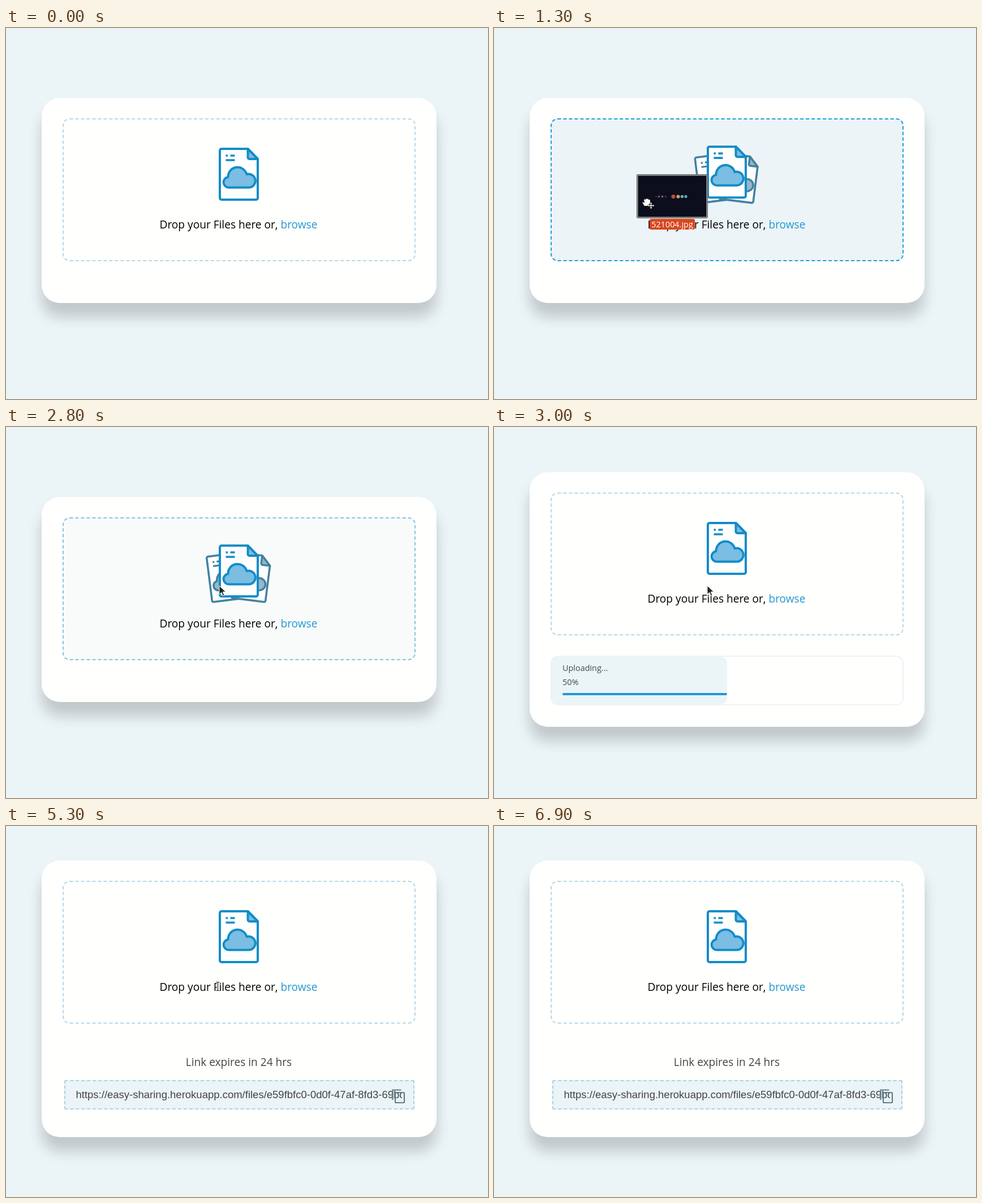
Recreate the animation shown at these times as an HTML page. Size 852 by 657 pixels, loop 7400 ms.

```html
<!DOCTYPE html>
<html lang="en">
<head>
<meta charset="utf-8">
<title>File drop upload</title>
<style>
  html, body { margin: 0; width: 100%; height: 100%; overflow: hidden; background: #ebf4f7; }
  div, svg { position: absolute; box-sizing: border-box; }
  svg { left: 0; top: 0; width: 852px; height: 100%; }
  text { font: 19.1px "Open Sans", "Noto Sans", sans-serif; }
  #stage { inset: 0; overflow: hidden; contain: strict; }
  #panel { left: 0; width: 852px; }
  #card { left: 63px; width: 698px; height: 100%; border-radius: 32px; background: #fffffd; box-shadow: 0 25px 25px rgba(0, 0, 0, .18); }
  #zone { left: 100px; top: 36px; width: 624px; height: 253px; border: 2px dashed; border-radius: 12.5px; }
  #link { left: 103px; top: 389px; width: 619px; height: 52px; border: 2px dashed #a9d3e6; border-radius: 2px; background: #ebf4f7; }
  #url { font: 18.5px "Liberation Sans", Arial, sans-serif; }
  .side { filter: grayscale(.5); }
  .small { font-size: 14.4px; }
</style>
</head>
<body>
<div id="stage">
<div id="panel">
  <div id="card"></div>
  <div id="zone"></div>
  <div id="link"></div>
  <svg>
    <defs>
      <g id="paper" stroke="#118dc8" stroke-width="4" stroke-linejoin="round">
        <path fill="#fffffd" d="M-30.5-92H16L33.5-74V-5a3 3 0 0 1-3 3H-30.5a3 3 0 0 1-3-3V-89a3 3 0 0 1 3-3Z"/>
        <path fill="#7bbde3" d="M16-92V-77a3 3 0 0 0 3 3H33.5Z"/>
        <path fill="#7bbde3" d="M-17.5-23.5A9.3 9.3 0 0 1-19-42A16.8 16.8 0 0 1 14-47A12 12 0 1 1 16.5-23.5Z"/>
        <path fill="none" stroke-width="3.6" d="M-23-80h3.5m4.5 0h8M-23-72h16"/>
      </g>
      <clipPath id="field"><rect x="120" y="390" width="580" height="50"/></clipPath>
    </defs>
    <g transform="translate(411.5 182)">
      <g class="side"><use id="left" href="#paper"/></g>
      <g class="side"><use id="right" href="#paper"/></g>
      <use id="front" href="#paper"/>
    </g>
    <text x="271.5" y="231">Drop your Files here or, <tspan fill="#2199d0">browse</tspan></text>
    <g id="progress">
      <rect x="101" y="326" width="622" height="86" rx="12" fill="none" stroke="#ebf4f7" stroke-width="2"/>
      <rect id="fill" x="102" y="327" height="84" rx="11" fill="#ebf4f7"/>
      <g opacity=".7">
        <text class="small" x="121" y="352">Uploading...</text>
        <text class="small" id="percent" x="121" y="377"></text>
      </g>
      <rect id="bar" x="121" y="391" height="4" rx="2" fill="#2199d0"/>
    </g>
    <g id="result" fill="#444">
      <text x="411.5" y="364" text-anchor="middle">Link expires in 24 hrs</text>
      <g clip-path="url(#field)">
        <text id="url" x="123.5" y="421">https://easy-sharing.herokuapp.com/files/e59fbfc0-0d0f-47af-8fd3-69bc</text>
      </g>
      <g fill="none" stroke="#607d8b" stroke-width="2.2">
        <path d="M683.5 424V406.5H698.5"/>
        <rect x="688" y="411" width="16" height="18" rx="1"/>
      </g>
    </g>
  </svg>
</div>
<svg>
  <g id="thumb">
    <rect x=".5" y=".5" width="125" height="77" rx="1.5" fill="#a9aaa8" stroke="#555"/>
    <rect x="2.5" y="2.5" width="121" height="73" fill="#0c0e1d"/>
    <g id="planets"></g>
    <rect x="23" y="79" width="80" height="19" rx="3" fill="#d8471f"/>
    <text class="small" x="63" y="94" text-anchor="middle" fill="#fff">521004.jpg</text>
  </g>
  <g id="hand">
    <path fill="#fff" stroke="#111" stroke-width="1.2" stroke-linejoin="round" d="M4 15L1 10Q-.5 7 2 7L4 8.5L3 3.5Q4 1 6 3Q7-.5 9 2Q11 0 12 3Q14.5 2 15 5V10L13 15Z"/>
    <g id="copyBadge"><circle cx="16" cy="16" r="4.6" fill="#1ca8e8"/><path stroke="#fff" stroke-width="1.3" d="M13.5 16h5M16 13.5v5"/></g>
    <path id="moveBadge" fill="#fff" stroke="#111" stroke-width=".7" d="M16 8l2.5 3h-1.5v2h2v-1.5l3 2.5-3 2.5v-1.5h-2v2h1.5l-2.5 3-2.5-3h1.5v-2h-2v1.5l-3-2.5 3-2.5v1.5h2v-2h-1.5z"/>
  </g>
  <path id="arrow" fill="#222" stroke="#fff" d="M0 0V15.5L3.8 12L6.5 18L9 17L6.3 11H11.5Z"/>
  <g id="beam" fill="none">
    <path stroke="#fff" stroke-width="3.4" d="M-3-7.5H3M0-7V7M-3 7.5H3"/>
    <path stroke="#222" stroke-width="1.2" d="M-3-7.5H3M0-7V7M-3 7.5H3"/>
  </g>
</svg>
</div>
<script>
const LOOP = 7400, STEP = 100;
const $ = id => document.getElementById(id);
const clamp = x => Math.min(1, Math.max(0, x));
const easeInOut = x => x * x * (3 - 2 * x);
const easeOut = x => 1 - (1 - x) ** 2;
const show = (id, on) => $(id).style.display = on ? '' : 'none';
const move = (id, [x, y]) => $(id).setAttribute('transform', `translate(${x} ${y})`);
const mix = (a, b, k) => `rgb(${a.map((v, i) => Math.round(v + (b[i] - v) * k))})`;

// Linear path through [time, x, y] points
function along(points, t) {
  const i = points.findIndex(p => p[0] > t);
  if (i < 0) return points.at(-1).slice(1);
  if (i === 0) return points[0].slice(1);
  const [a, b] = [points[i - 1], points[i]];
  const k = (t - a[0]) / (b[0] - a[0]);
  return [1, 2].map(n => a[n] + (b[n] - a[n]) * k);
}

const thumbPath = [
  [800, -110, 215], [900, -30, 220], [1000, 59, 227], [1200, 200, 247], [1300, 252, 259], [1400, 277, 264],
  [1600, 277, 264], [1700, 287, 257], [1900, 334, 232], [2000, 353, 212], [2100, 347, 231],
  [2200, 347, 231], [2300, 336, 228]
];
// Offset of the hand from the dragged thumbnail, which it trails at first
const handOffset = [[800, -60, 10], [1000, -52, 16], [1400, 30, 50]];
const arrowPath = [
  [5300, 377, 281], [5400, 364, 262], [5500, 338, 234], [5700, 256, 170], [5900, 186, 131], [6000, 174, 126],
  [6100, 173, 125], [6200, 173, 125], [6300, 167, 117], [6500, 135, 75], [6700, 82, 22], [6800, 46, 2]
];

$('planets').innerHTML = [
  [34.5, .8, '#999'], [39.5, 1.8, '#b5532f'], [45.5, 2, '#3d6d9c'], [51.5, 1.5, '#8d3527'],
  [65, 3.6, '#c44a2f'], [73.5, 3.1, '#b5a58e'], [80.5, 2.7, '#7fa5a0'], [87, 2.7, '#58a0aa']
].map(([x, r, c]) => `<circle cx="${x}" cy="39.5" r="${r}" fill="${c}"/>`).join('');

function render(t) {
  const dragging = t >= 800 && t < 2700;
  const uploading = t >= 2900 && t < 3400;
  const done = t >= 3400;

  // Card layout
  const [top, height] = done ? [61, 490] : uploading ? [80, 451] : [124, 363];
  $('panel').style.top = top + 'px';
  $('panel').style.height = height + 'px';
  show('progress', uploading);
  show('link', done);
  show('result', done);

  // Drop zone highlight and fanned papers
  const hover = (ease, length) => t < 2700
    ? ease(clamp((t - 1140) / length))
    : 1 - ease(clamp((t - 2713) / length));
  const glow = hover(easeOut, 200), fan = hover(easeInOut, 250);
  $('zone').style.background = mix([255, 255, 253], [235, 244, 247], glow);
  $('zone').style.borderColor = mix([183, 216, 232], [25, 157, 212], glow);
  move('front', [0, -5.5 * fan]);
  for (const [id, side] of [['left', -1], ['right', 1]])
    $(id).setAttribute('transform', `rotate(${10 * side * fan}) scale(.9) translate(${26 * side * fan})`);

  const loaded = clamp((t - 2900) / 200);
  $('percent').textContent = Math.round(loaded * 100) + '%';
  $('fill').setAttribute('width', 620 * loaded);
  $('bar').setAttribute('width', 582 * loaded);

  // Dragged file and pointers
  const thumb = along(thumbPath, t), offset = along(handOffset, t);
  show('thumb', dragging);
  show('hand', dragging);
  move('thumb', thumb);
  move('hand', thumb.map((v, i) => v + offset[i]));
  show('copyBadge', t < 1200);
  show('moveBadge', t >= 1200);
  const overText = t >= 4500 && t < 5400;
  show('beam', overText);
  move('beam', [374.5, 284]);
  show('arrow', t >= 2700 && t < 6900 && !overText);
  move('arrow', along(arrowPath, t));
}

function frame() {
  const t = performance.now() % LOOP;
  render(Math.floor(t / STEP) * STEP);
  requestAnimationFrame(frame);
}
frame();
</script>
</body>
</html>
```
